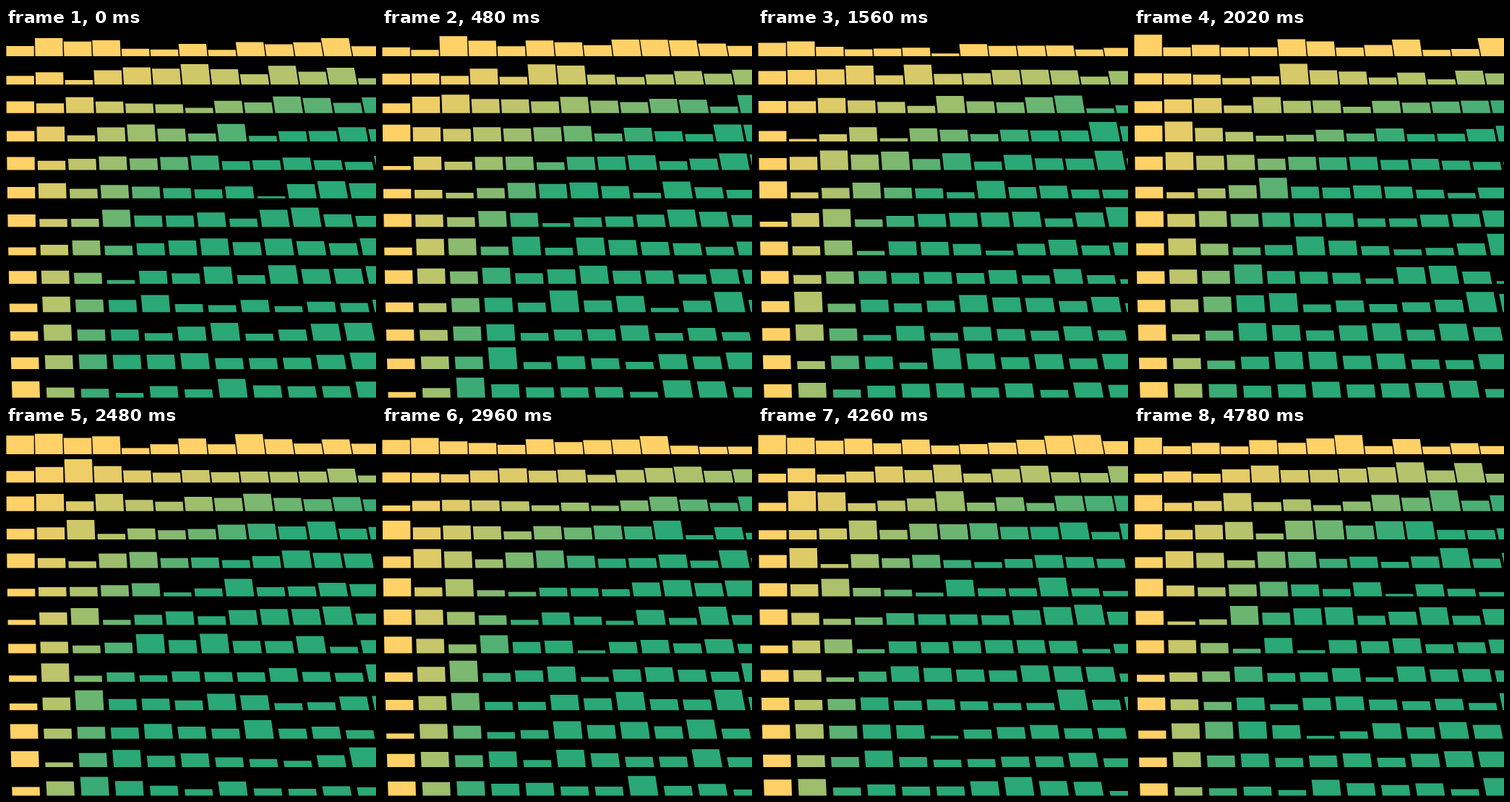
These frames come from a looping animation (512x512 px, 4.8 s). An HTML page with a canvas:

```html
<!DOCTYPE html>
<html lang="en">
<head>
<meta charset="utf-8">
<title>Skewed bars</title>
<style>
  html, body { margin: 0; height: 100%; overflow: hidden; background: #000; }
  canvas { display: block; width: 100vw; height: 100vh; }
</style>
</head>
<body>
<canvas width="512" height="512"></canvas>
<script>
const ctx = document.querySelector('canvas').getContext('2d');
const N = 13, CELL = 512 / N, WIDTH = CELL - 1;
const STEP = 20, LOOP = 4800;
const YELLOW = [255, 209, 102], GREEN = [42, 168, 118];

// Seeded generator (mulberry32)
function seeded(seed) {
  return () => {
    seed = seed + 0x6D2B79F5 | 0;
    let t = Math.imul(seed ^ seed >>> 15, 1 | seed);
    t = t + Math.imul(t ^ t >>> 7, 61 | t) ^ t;
    return ((t ^ t >>> 14) >>> 0) / 4294967296;
  };
}

function mix(t) {
  return `rgb(${YELLOW.map((v, k) => Math.round(v + (GREEN[k] - v) * t))})`;
}

function drawBar(col, row, height) {
  const x = 0.4 + 0.0525 * row * (row + 1) + col * (40 + 0.66 * row);
  const y = CELL * (row + 1) - 0.5;
  const lean = height * (0.66 * col + 0.105 * row) / CELL;
  ctx.fillStyle = mix(Math.min(1, col * row / 26));
  ctx.beginPath();
  ctx.moveTo(x, y);
  ctx.lineTo(x - lean, y - height);
  ctx.lineTo(x - lean + WIDTH, y - height);
  ctx.lineTo(x + WIDTH, y);
  ctx.fill();
}

function draw(time) {
  const random = seeded(1 + Math.floor(time % LOOP / STEP) * 7919);
  ctx.fillStyle = '#000';
  ctx.fillRect(0, 0, 512, 512);
  for (let row = 0; row < N; row++) {
    for (let col = 0; col < N; col++) {
      // Three summed draws make middling heights the most common
      drawBar(col, row, 1.8 + 10.4 * (random() + random() + random()));
    }
  }
}

function tick() {
  draw(performance.now());
  requestAnimationFrame(tick);
}
tick();
</script>
</body>
</html>
```
